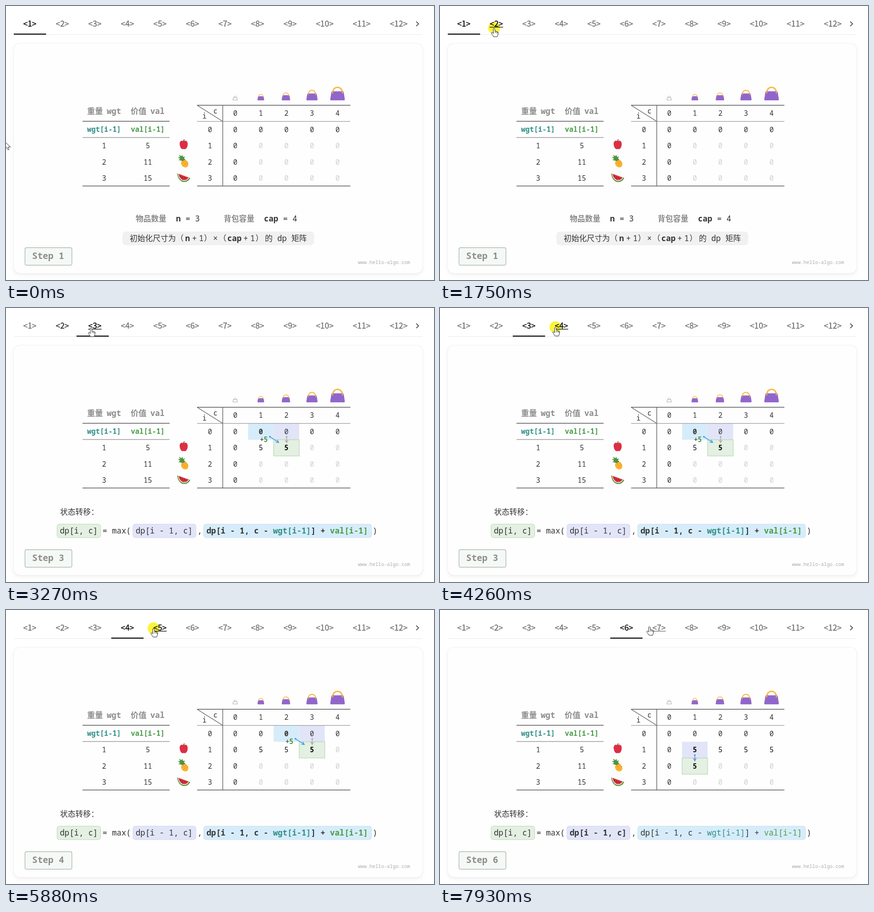
An HTML page for the animation above (7990 ms loop, 934 by 599 pixels).

```html
<!DOCTYPE html>
<html lang="zh-CN">
<head>
<meta charset="utf-8">
<title>Knapsack DP steps</title>
<style>
  html, body { margin: 0; width: 100%; height: 100%; overflow: hidden; background: #fff; }
  #card {
    position: absolute; left: 17px; top: 82px; width: 892px; height: 502px;
    border-radius: 13px; background: #fefefe;
    box-shadow: 0 4px 11px rgba(0,0,0,.06), 0 0 1.5px rgba(0,0,0,.18);
  }
  svg { position: absolute; left: 0; top: 0; display: block; }
  text { white-space: pre; font-family: "Noto Sans Mono", "DejaVu Sans Mono", monospace; }
  .cjk { font-family: "Noto Sans CJK SC", "Noto Sans CJK", "Noto Sans", sans-serif; }
  .tab { font-size: 17.4px; text-anchor: middle; stroke-width: .35px; }
  #click { mix-blend-mode: multiply; }
</style>
</head>
<body>
<div id="card"></div>
<svg width="934" height="599" viewBox="0 0 934 599">
  <defs>
    <g id="bag">
      <path d="M-10.5-20C-9-33 9-33 10.5-20" fill="none" stroke="#f9b73c" stroke-width="3"/>
      <path d="M-11.5-20.5H11.5Q13.5-20.5 14-18.5L16.5-3Q17 0 14 0H-14Q-17 0-16.5-3L-14-18.5Q-13.5-20.5-11.5-20.5Z" fill="#9166cb"/>
      <path d="M-11-20V-16M11-20V-16" stroke="#f9b73c" stroke-width="2.5"/>
    </g>
  </defs>
  <g id="tabs"></g>
  <path d="M17 62.5H909" stroke="#e8e8e8"/>
  <rect id="bar" y="60.3" width="70.5" height="2.4" fill="#111"/>
  <path d="M895.2 34L900.4 39L895.2 44" fill="none" stroke="#555" stroke-width="1.8"/>
  <g id="scene"></g>
  <circle id="click" r="13" fill="#fbf43a"/>
  <g id="cursor" fill="#fff" stroke="#222" stroke-linejoin="round">
    <path id="arrow" d="M0 0V15.5L3.8 12.2L6.3 17.5L8.8 16.4L6.4 11.3H11.5Z"/>
    <g id="hand">
      <path d="M-2 1.6Q-.2-.5 1.5 1.6L2.2 7.2Q4.3 6.2 5 8Q7 7 7.6 9Q9.3 8.5 9 11L8.4 15L6.8 19.2H-1L-4.8 13.4Q-6.8 10.4-4.6 9.8L-1.2 12Z"/>
      <path d="M2.4 7V11M5 8.2V11.5M7.4 9V12" fill="none" stroke-width=".8"/>
    </g>
  </g>
</svg>
<script>
const LOOP = 7990;
const $ = id => document.getElementById(id);
const clamp = v => Math.max(0, Math.min(1, v));
const smooth = v => (v = clamp(v), v * v * (3 - 2 * v));

const DARK = '#333', GRAY = '#8c8c8c', TEAL = '#2f8f86', GREEN = '#4a9b49';
const FILL = { blue: '#d7ecfa', lilac: '#e2e5f8', green: '#e4f0e2' };
const EDGE = { blue: '#c5e0f2', lilac: '#d0d5f0', green: '#b4d8ae' };
const colX = c => 500.3 + 55.8 * c;
const rowY = r => 270 + 35.5 * r;

// ---- Drawing helpers ----
function text(x, y, str, { size = 15.4, fill = DARK, bold = false, mid = false, cjk = false } = {}) {
  return `<text x="${x}" y="${y}" font-size="${size}" fill="${fill}"` +
    `${bold ? ' font-weight="700"' : ''}${mid ? ' text-anchor="middle"' : ''}${cjk ? ' class="cjk"' : ''}>${str}</text>`;
}
const line = (d, color = '#555', w = 1.3) => `<path d="${d}" fill="none" stroke="${color}" stroke-width="${w}"/>`;
const num = (x, y, str, opt) => text(x, y + 5.6, str, { mid: true, ...opt });
const tint = (str, color) => `<tspan fill="${color}">${str}</tspan>`;

function chip(x, w, kind, str, bold) {
  return `<rect x="${x}" y="472.5" width="${w}" height="29.5" rx="5" fill="${FILL[kind]}" stroke="${EDGE[kind]}"/>` +
    text(x + 6, 493.3, str, { size: 17.3, bold });
}

function cell(c, r, kind) {
  const edge = kind === 'green' ? ` stroke="${EDGE.green}" stroke-width="1.2"` : '';
  return `<rect x="${colX(c) - 27.9}" y="${rowY(r) - 17.5}" width="55.8" height="35.5" fill="${FILL[kind]}"${edge}/>`;
}

function arrowTo(x, y, len, angle, color) {
  return `<g transform="translate(${x} ${y}) rotate(${angle})" fill="${color}"><circle r="1.8"/>` +
    line(`M0 0H${len - 2}M${len - 6}-3.2L${len} 0L${len - 6} 3.2`, color, 1.5) + '</g>';
}

function fruits() {
  return `<path d="M388 296C383 292 378.500 296 379 302C379.500 309 383 313.500 386 313Q388 312 390 313C393 313.500 397 308 396.500 301C396 295 392 293 388 296Z" fill="#dd2e44"/>
    <path d="M388 297Q387 293.500 389.500 292" fill="none" stroke="#6b3f25" stroke-width="1.5"/>
    <ellipse cx="390" cy="344.500" rx="7.600" ry="9" transform="rotate(-35 390 344.500)" fill="#fbb831"/>
    <path d="M386 339L395 351M391 336.500L397 345M383.500 345L394 338M385.500 350L397 342" stroke="#e8932b" stroke-width=".9"/>
    <path d="M385.500 339L376 336.500L380 334.500L375 330L380 330.500L377.500 325L383 328.500L384.500 325L386.500 330L390.500 329L388.500 333L391.500 336Z" fill="#4d9440"/>
    <path d="M373.500 366L402 376C396 389 376 389 373.500 366Z" fill="#4f8b3b"/>
    <path d="M375 366.500L400 375.500C394 386 378 386 375 366.500Z" fill="#fbe6c0"/>
    <path d="M376.500 367L398.500 375C393 383.500 380 383.500 376.500 367Z" fill="#dd2e44"/>
    <path d="M380 371.500l1 1.500M384 374l1 1.500M389 374.500l.5 1.500M385 378l1 1M392 377l-.5 1.500" stroke="#30201f" stroke-width="1.400"/>`;
}

function bags() {
  const small = `<g transform="translate(500 206)" fill="none" stroke="#aaa"><path d="M-4-5.500H4L5-.5H-5ZM-3-5.500C-3-10 3-10 3-5.500"/></g>`;
  return small + [.46, .58, .77, 1].map((s, i) =>
    `<use href="#bag" transform="translate(${colX(i + 1) - (i === 1 ? 1 : 0)} 206.3) scale(${s * .96})"/>`).join('');
}

function leftTable() {
  const head = { size: 17.3, fill: GRAY, bold: true };
  const cjk = { ...head, cjk: true };
  let s = text(177, 236, '重量', cjk) + text(220, 236, 'wgt', head) +
    text(272, 236, '价值', cjk) + text(315, 236, 'val', head) +
    text(177, 275, 'wgt[i-1]', { fill: TEAL, bold: true }) + text(272.5, 275, 'val[i-1]', { fill: GREEN, bold: true });
  [5, 11, 15].forEach((v, i) => s += num(214, rowY(i + 1), i + 1) + num(309.5, rowY(i + 1), v));
  return s + line('M167 252H357M167 393.500H357') + line('M167 287.500H357', '#999');
}

// Steps 2-5 fill row 1 from left to right; step 6 starts row 2.
function matrix(step) {
  const col = step === 6 ? 1 : step - 1, row = step === 6 ? 2 : 1;
  const active = step > 1, diagonal = active && row === 1;
  let s = '';
  if (active) s += cell(col, row - 1, 'lilac') + (diagonal ? cell(col - 1, 0, 'blue') : '') + cell(col, row, 'green');
  s += line('M417 217H751.500M417 393.500H751.500M473 217V393.500') + line('M417 252.300H751.500', '#999') +
    line('M417 217L473 252.300', '#555', 1.1) + num(457, 229.5, 'c') + num(433, 240.5, 'i');
  for (let c = 0; c < 5; c++) {
    s += num(colX(c), 234, c);
    for (let r = 0; r < 4; r++) {
      const filled = r === 0 || c === 0;
      const solved = active && c > 0 && (r < row || (r === row && c <= col)) && r > 0;
      const now = active && r === row && c === col;
      const from = diagonal ? r === 0 && c === col - 1 : active && r === row - 1 && c === col;
      s += num(colX(c), rowY(r), solved ? 5 : 0, {
        fill: solved ? '#111' : filled ? DARK : '#d0d0d0', bold: now || from
      });
    }
  }
  for (let r = 0; r < 4; r++) s += num(445, rowY(r), r);
  if (diagonal) {
    const x = colX(col);
    s += num(x - 53.5, 287.3, '+') + num(x - 45, 287.3, '5', { fill: GREEN, bold: true }) +
      arrowTo(x - 36, 281.5, 23, 33, '#3a9fe8') + arrowTo(x + .5, 281.5, 13, 90, '#aaa');
  } else if (active) {
    s += arrowTo(colX(col), 317, 13, 90, '#5d84dd');
  }
  return s;
}

function introNote() {
  const big = { size: 17.3 }, bold = { size: 17.3, bold: true };
  const label = { size: 16.8, fill: GRAY, bold: true, cjk: true }, han = { size: 16.8, cjk: true };
  const y = 513.8;
  return text(283, 470.5, '物品数量', label) + text(371, 471, 'n', bold) + text(381.4, 471, ' = 3', big) +
    text(475, 470.5, '背包容量', label) + text(563, 471, 'cap', bold) + text(594.1, 471, ' = 4', big) +
    '<rect x="254" y="493" width="418.500" height="30" rx="8" fill="#f1f1f1"/>' +
    text(270, y, '初始化尺寸为（', han) + text(391, y, 'n', bold) + text(406, y, '+', big) + text(421, y, '1', big) +
    text(432, y, '）', han) + num(457, 508, '×', big) + text(464, y, '（', han) + text(483, y, 'cap', bold) +
    text(518, y, '+', big) + text(533, y, '1', big) + text(544.5, y, '）', han) + text(565, y, '的', han) +
    text(592, y, 'dp', big) + text(623, y, '矩阵', han);
}

function formula(step) {
  const big = { size: 17.3 }, fits = step < 6;
  return text(118, 452, '状态转移：', { size: 16.8, cjk: true }) +
    chip(111.5, 95, 'green', 'dp[i, c]') + text(210.5, 493.3, '= max(', big) +
    chip(277, 137.5, 'lilac', 'dp[i - 1, c]', !fits) + text(417.5, 493.3, ',', big) +
    chip(431.5, 366, 'blue', `dp[i - 1, c - ${tint('wgt[i-1]', TEAL)}] + ${tint('val[i-1]', GREEN)}`, fits) +
    text(800, 493.3, ')', big);
}

function scene(step) {
  return bags() + leftTable() + fruits() + matrix(step) + (step === 1 ? introNote() : formula(step)) +
    '<rect x="41.500" y="528.300" width="102.300" height="38.400" rx="3.500" fill="#f5f9f6" stroke="#a3aca7" stroke-width="1.200"/>' +
    text(57, 553, 'Step ' + step, { size: 19.4, fill: GRAY, bold: true }) +
    text(768, 563.5, 'www.hello-algo.com', { size: 10.55, fill: '#adadad' });
}

// ---- Tabs ----
const tabX = [...Array(9).keys()].map(i => 52 + 71 * i).concat(695.5, 776, 857);
$('tabs').innerHTML = tabX.map((x, i) =>
  `<text class="tab cjk" x="${x}" y="44.600">&lt;${i + 1}&gt;</text>` +
  `<rect x="${x - 14.7}" y="45.700" width="29.400" height="1.300"/>`).join('');
const labels = [...$('tabs').querySelectorAll('text')];
const rules = [...$('tabs').querySelectorAll('rect')];

// ---- Timeline ----
const presses = [1750, 2970, 4260, 5880, 7140];
const releases = [1880, 3100, 4435, 6055, 7315];
const hovers = [-999, 1000, 2530, 3640, 5170, 6566, 7870];
// Cursor moves: start, end, from, to.
const moves = [
  [350, 430, [-2, 297], [-20, 255]],
  [630, 1270, [4, 176], [118, 48]],
  [2240, 2540, [118, 48], [166, 46]],
  [2560, 2790, [166, 46], [185.5, 43.5]],
  [3380, 3710, [185.5, 43.5], [252, 42]],
  [4900, 5240, [252, 42], [322, 40]],
  [6450, 6660, [322, 40], [407, 37]],
  [7760, 7940, [407, 37], [457.5, 36]]
];

function cursorAt(t) {
  const [start, end, a, b] = moves.filter(m => t >= m[0]).pop() || moves[0];
  const k = smooth((t - start) / (end - start));
  return a.map((v, i) => v + (b[i] - v) * k);
}

// Solves cubic-bezier(.4, 0, .2, 1) for x by bisection.
function standardEase(x) {
  let lo = 0, hi = 1, u = x;
  for (let i = 0; i < 18; i++) {
    u = (lo + hi) / 2;
    const bx = 1.2 * u * (1 - u) ** 2 + .6 * u * u * (1 - u) + u ** 3;
    if (bx < x) lo = u; else hi = u;
  }
  return u * u * (3 - 2 * u);
}

let shown = 0;
function render(t) {
  const step = 1 + releases.filter(r => t >= r).length;
  if (step !== shown) $('scene').innerHTML = scene(shown = step);

  const pos = releases.reduce((p, r) => p + standardEase(clamp((t - r) / 250)), 0);
  $('bar').setAttribute('x', 17 + 70.9 * pos);

  const [x, y] = cursorAt(t);
  const over = y > 18 && y < 63 && x > 17 ? Math.floor((x - 17) / 70.9) : -1;
  labels.forEach((label, i) => {
    const on = i in hovers ? clamp((t - hovers[i] - 90) / 170) : 0;
    const off = i in releases ? clamp((t - releases[i] - 120) / 130) : 0;
    const v = Math.round(112 - 104 * on * (1 - off)), color = `rgb(${v},${v},${v})`;
    label.setAttribute('fill', color);
    label.setAttribute('stroke', color);
    rules[i].setAttribute('fill', color);
    rules[i].style.display = i === over ? '' : 'none';
  });

  const place = `translate(${x} ${y})`;
  $('cursor').setAttribute('transform', place);
  $('click').setAttribute('transform', place);
  $('hand').style.display = over >= 0 ? '' : 'none';
  $('arrow').style.display = over >= 0 ? 'none' : '';
  $('cursor').style.display = t >= 420 && t < 660 ? 'none' : '';
  $('click').style.display = presses.some((p, i) => t >= p && t < releases[i]) ? '' : 'none';
}

const begin = performance.now();
function frame() {
  render((performance.now() - begin) % LOOP);
  requestAnimationFrame(frame);
}
frame();
</script>
</body>
</html>
```
